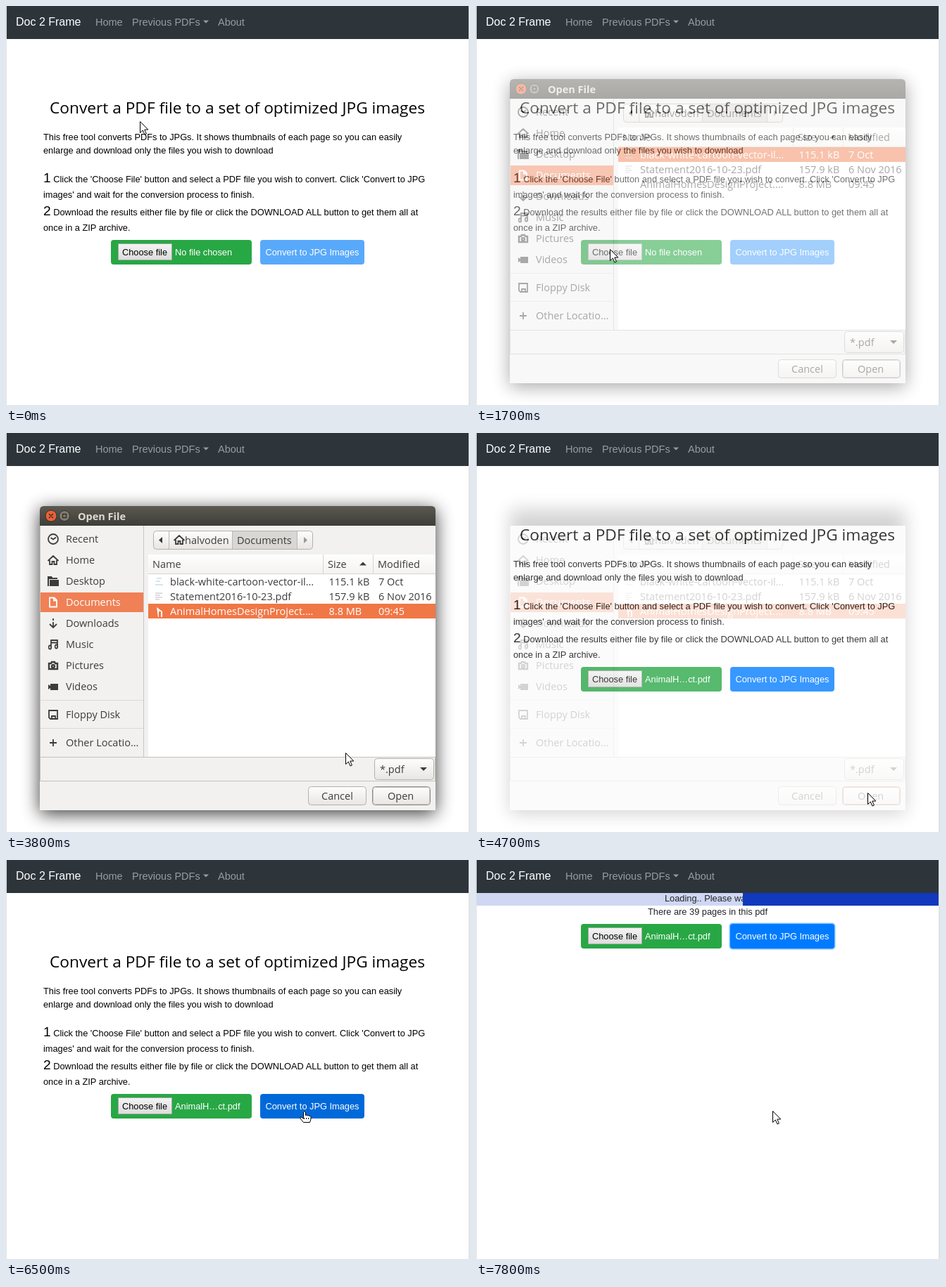
These frames come from a looping animation (659x568 px, 8000 ms). An HTML page:

```html
<!DOCTYPE html>
<html lang="en">
<head>
<meta charset="utf-8">
<title>PDF converter</title>
<style>
  html, body { margin: 0; width: 100%; height: 100%; overflow: hidden; background: #fff; }
  svg { display: block; font: 12.8px "Liberation Sans", Arial, sans-serif; }
  text { white-space: pre; }
  .nav { font-size: 14.5px; fill: #999c9f; }
  .dialog { font: 14.5px "Open Sans", "Noto Sans", sans-serif; fill: #3c3c3c; }
  .icon { fill: none; stroke: #3c3c3c; stroke-width: 1.8; }
  .solid { fill: #3c3c3c; }
  .on { fill: #fff; }
  .on .icon { stroke: #fff; }
  .row > rect { fill: none; }
  .row.on > rect { fill: #f07746; }
</style>
</head>
<body>
<svg id="stage" width="659" height="568" viewBox="0 0 659 568"></svg>
<script>
const LOOP = 8000, FRAME = 100;
const stage = document.getElementById('stage');

const text = (x, y, s, attrs = '') => `<text x="${x}" y="${y}" ${attrs}>${s}</text>`;
const rect = (x, y, w, h, fill, attrs = '') =>
  `<rect x="${x}" y="${y}" width="${w}" height="${h}" fill="${fill}" ${attrs}/>`;
const path = (d, attrs = '') => `<path d="${d}" ${attrs}/>`;
const group = (attrs, ...parts) => `<g ${attrs}>${parts.join('')}</g>`;
const gradient = (id, top, bottom) =>
  `<linearGradient id="${id}" x2="0" y2="1"><stop stop-color="${top}"/><stop offset="1" stop-color="${bottom}"/></linearGradient>`;
const dialogButton = (x, y, w, h, border = '#b5b1ab') =>
  rect(x + .5, y + .5, w - 1, h - 1, 'url(#face)', `rx="4" stroke="${border}"`);

const defs = `<defs>
  ${gradient('bar', '#5b5950', '#3d3c37')}
  ${gradient('face', '#fdfdfc', '#e8e6e3')}
  ${gradient('native', '#f4f4f4', '#dcdcdc')}
  <filter id="blur" x="-20%" y="-20%" width="140%" height="140%"><feGaussianBlur stdDeviation="13"/></filter>
</defs>`;

const nav = [
  rect(0, 0, 1, 568, '#e2e2e2'), rect(657, 0, 2, 568, '#e2e2e2'),
  rect(1, 0, 656, 47, '#2d353b'),
  text(14, 28, 'Doc 2 Frame', 'font-size="16" fill="#fff"'),
  group('class="nav"', text(127, 28, 'Home'), text(179, 28, 'Previous PDFs'), text(301, 28, 'About'),
    path('M280 20.5h8l-4 4z'))
].join('');

const big = n => `<tspan font-size="19.2">${n}</tspan> `;
const intro = group('id="intro"',
  text(62, 152.5, 'Convert a PDF file to a set of optimized JPG images',
    'font-size="22.7" font-family="Open Sans, Noto Sans, sans-serif"'),
  text(53, 191, 'This free tool converts PDFs to JPGs. It shows thumbnails of each page so you can easily'),
  text(53, 210, 'enlarge and download only the files you wish to download'),
  text(53, 251, big(1) + "Click the 'Choose File' button and select a PDF file you wish to convert. Click 'Convert to JPG"),
  text(53, 273, "images' and wait for the conversion process to finish."),
  text(53, 298, big(2) + 'Download the results either file by file or click the DOWNLOAD ALL button to get them all at'),
  text(53, 320, 'once in a ZIP archive.'));

const loading = group('id="loading"',
  rect(1, 47, 656, 18, '#d0d7f3'),
  text(268, 59, 'Loading.. Please wait', 'fill="#212529"'),
  '<svg x="1" y="47" width="656" height="18">' + rect(0, 0, 300, 18, '#1039bd', 'id="sweep"') + '</svg>',
  text(244, 78, 'There are 39 pages in this pdf', 'fill="#212529"'));

const buttons = group('id="buttons"',
  rect(149, 333, 200, 35, '#28a745', 'id="choose" rx="4"'),
  rect(159.5, 338.5, 76, 23, 'url(#native)', 'stroke="#a6a6a6"'),
  text(165, 355, 'Choose file'),
  text(240, 355, '', 'id="fileName" fill="#fff"'),
  rect(359.5, 331.5, 151, 38, '#80bdff', 'id="glow" rx="5"'),
  rect(361, 333, 148, 35, '#007bff', 'id="convert" rx="4"'),
  text(368.5, 355, 'Convert to JPG Images', 'fill="#fff"'));

// Sidebar icons, drawn around their own centre
const house = 'M-7.5 1L0-6L7.5 1M-5 0V6H-1.5V2H1.5V6H5V0';
const places = [
  ['Recent', path('M-7 0a7 7 0 1 0 14 0a7 7 0 1 0-14 0M-3.5-2L0 .5L4-2.5')],
  ['Home', path(house)],
  ['Desktop', path('M-8-7H-2L-1-5H6V-3H-6V7H-8ZM-5-2H8V7H-5Z', 'class="solid" stroke="none"')],
  ['Documents', path('M-5-6.5H1.5L5-3V6.5H-5ZM1-6V-2.5H5')],
  ['Downloads', path('M0-7V-4M0-2V5M-5 1L0 6L5 1')],
  ['Music', path('M-3 4V-6H6V3M-3-2.5H6M-6 4a1.7 1.7 0 1 0 3 0a1.7 1.7 0 1 0-3 0M3 3a1.7 1.7 0 1 0 3 0a1.7 1.7 0 1 0-3 0')],
  ['Pictures', path('M-6-3H-3L-2-5H2L3-3H6V5H-6ZM-2 1a2 2 0 1 0 4 0a2 2 0 1 0-4 0', 'stroke-width="2.4"')],
  ['Videos', path('M-7-3L-4-1V-4H7V5H-4V2L-7 4Z', 'class="solid" stroke="none"')],
  ['Floppy Disk', path('M-6-6H6V6H-4L-6 4ZM-2 6V2H3V6')],
  ['Other Locatio…', path('M-5 0H5M0-5V5')]
];
const sidebar = places.map(([name, icon], i) => {
  const y = 151 + i * 30 + Math.max(0, i - 7) * 10;
  const selected = name === 'Documents';
  return (selected ? rect(49, y - 14, 147, 28, '#f08055') : '') +
    group(selected ? 'class="on"' : '',
      group(`class="icon" transform="translate(67 ${y})"`, icon), text(85, y + 5, name));
}).join('');

const files = [
  ['black-white-cartoon-vector-il…', '115.1 kB', '7 Oct',
    path('M214 207h7M213 211h6M212 216h11', 'stroke="#a9cbe2"')],
  ['Statement2016-10-23.pdf', '157.9 kB', '6 Nov 2016',
    path('M212 228h10M212 231h7M212 234h10M212 237h6', 'stroke="#bbb"')],
  ['AnimalHomesDesignProject.…', '8.8 MB', '09:45',
    rect(210, 247, 15, 15, '#a83a35') + path('M214 248l8 6v8h-6z', 'fill="#fff"') + rect(217, 254, 3, 8, '#35406b')]
];
const rows = files.map(([name, size, date, icon], i) => {
  const y = 217 + i * 21;
  return group('class="row"', rect(202, y - 16, 408, 21, ''), icon,
    text(233, y, name), text(458.5, y, size), text(529, y, date));
}).join('');

const dialog = group('id="dialog" class="dialog"',
  rect(48, 109, 562, 433, '#000', 'opacity=".78" filter="url(#blur)"'),
  group('id="titleBar"',
    path('M48 133V110q0-6 6-6H604q6 0 6 6V133z', 'fill="url(#bar)"'),
    '<circle cx="64" cy="118" r="8" fill="#ea6135" stroke="#33322e"/><circle cx="83" cy="118" r="7.5" fill="#7f7c72" stroke="#33322e"/>',
    path('M61 115l6 6m0-6l-6 6M80.500 115.500h5v5h-5z', 'fill="none" stroke="#3b2a22" stroke-width="1.3"'),
    text(102, 124, 'Open File', 'font-weight="700" fill="#dfdbd2"')),
  rect(48, 132, 562, 405, '#f2f1f0'),
  sidebar,
  path('M49 380.500h146M49 420.500h146', 'stroke="#dcdad8"'),
  path('M48.500 132V461M195.500 132V461', 'stroke="#c8c5c1"'),
  // Path bar
  dialogButton(209, 139, 227, 27),
  rect(322, 140, 91, 25, '#d9d7d4'),
  path('M231.500 140v25M321.500 140v25M413.500 140v25', 'stroke="#bdb9b4"'),
  path('M222 148v9l-5-4.500z'), path('M423 148v9l5-4.500z', 'fill="#999"'),
  path(house, 'class="icon" transform="translate(246 152)"'),
  text(254, 158, 'halvoden'), text(328, 158, 'Documents'),
  // File list
  rect(202, 173, 408, 288, '#fff'),
  rect(202, 173, 408, 27, 'url(#face)', 'opacity=".5"'),
  path('M202 200.500h408M450.500 173v27M521.500 173v27', 'stroke="#d6d4d1"'),
  text(208, 192, 'Name'), text(457, 192, 'Size'), text(528, 192, 'Modified'),
  path('M502 188.500h10l-5-5z'),
  rows,
  // Footer
  path('M48 461.500H609.500V495.500H48.500V461', 'fill="none" stroke="#c4c1bd"'),
  dialogButton(523, 463, 85, 31), text(531, 484, '*.pdf'), path('M588 476h10l-5 5z'),
  dialogButton(429, 503, 83, 27), text(448, 522, 'Cancel'),
  dialogButton(520, 503, 83, 27, '#8f8b86'),
  rect(521.5, 504.5, 80, 24, 'none', 'id="openRing" rx="3" stroke="#c9c6c2"'),
  text(542, 522, 'Open'));

const cursor = group('id="cursor" fill="#fff" stroke="#000" stroke-linejoin="round"',
  path('M.5 .5V16.500L4.300 13L7 19L9.400 18L6.800 12H11.800Z', 'id="arrow"'),
  path('M1.500 9.500V2q1.500-2.500 3 0V6.500q1.500-1.500 3 .5q1.500-1 2.500.5q1.500-.5 2 1V12L10.500 16.500H1.500L-3 11q-.5-3 2-1.500L1.500 11ZM2.500 10v2M5.500 10v2M8.500 10v2',
    'id="hand"'));

stage.innerHTML = defs + nav + intro + loading + buttons + dialog + cursor;

const ids = {};
stage.querySelectorAll('[id]').forEach(el => ids[el.id] = el);
const rowEls = [...stage.querySelectorAll('.row')];
const show = (el, on) => el.setAttribute('display', on ? 'inline' : 'none');

// Pointer stops: time, x, y
const stops = [
  [0, 190, 164], [300, 430, 330], [500, 310, 440], [700, 106, 400], [900, 160, 338],
  [1000, 164, 333], [1300, 190, 346], [1900, 190, 346], [2400, 264, 271], [2900, 264, 271],
  [3000, 262, 226], [3100, 262, 226], [3400, 258, 246], [3500, 258, 246], [3800, 482, 455],
  [4100, 556, 512], [5300, 556, 512], [5800, 421, 357], [LOOP, 421, 357]
];
function pointerAt(t) {
  const i = stops.findIndex(s => s[0] > t);
  const [t0, x0, y0] = stops[i - 1], [t1, x1, y1] = stops[i];
  const k = (t - t0) / (t1 - t0);
  return [Math.round(x0 + (x1 - x0) * k), Math.round(y0 + (y1 - y0) * k)];
}

function dialogOpacity(t) {
  if (t < 1500 || t >= 4900) return 0;
  if (t < 1800) return ((t - 1500) / 300) ** 2;
  return t < 4700 ? 1 : .22 * (4900 - t) / 200;
}

function render(t) {
  const [x, y] = pointerAt(t);
  const busy = t >= 6700, picked = t >= 4700;
  const overConvert = t >= 5400 && !busy && y < 368;

  ids.cursor.setAttribute('transform', `translate(${x} ${y})`);
  show(ids.hand, overConvert);
  show(ids.arrow, !overConvert);

  show(ids.intro, !busy);
  show(ids.loading, busy);
  ids.buttons.setAttribute('transform', `translate(0 ${busy ? -242 : 0})`);
  ids.choose.setAttribute('fill', t >= 900 && t < 1500 ? '#1f8836' : '#28a745');
  ids.fileName.textContent = picked ? 'AnimalH…ct.pdf' : 'No file chosen';
  ids.convert.setAttribute('fill', !picked ? '#59a9fb' : overConvert ? '#0069d9' : '#007bff');
  show(ids.glow, t >= 6600);

  // The sweep stalls while the document is being read
  const sweepTime = t < 7000 ? t + 300 : Math.max(t, 7300);
  ids.sweep.setAttribute('x', 378 + (sweepTime - 7800) * .945);

  const opacity = dialogOpacity(t);
  show(ids.dialog, opacity > 0);
  ids.dialog.setAttribute('opacity', opacity);
  show(ids.titleBar, !picked);
  ids.openRing.setAttribute('stroke', t >= 4500 ? '#f07746' : t >= 4100 ? '#e3b9a5' : '#c9c6c2');
  const selected = t < 3000 ? 0 : t < 3200 ? 1 : 2;
  rowEls.forEach((row, i) => row.classList.toggle('on', i === selected));
}

const start = performance.now();
function tick() {
  const t = (performance.now() - start) % LOOP;
  render(Math.floor(t / FRAME) * FRAME);
  requestAnimationFrame(tick);
}
tick();
</script>
</body>
</html>
```
